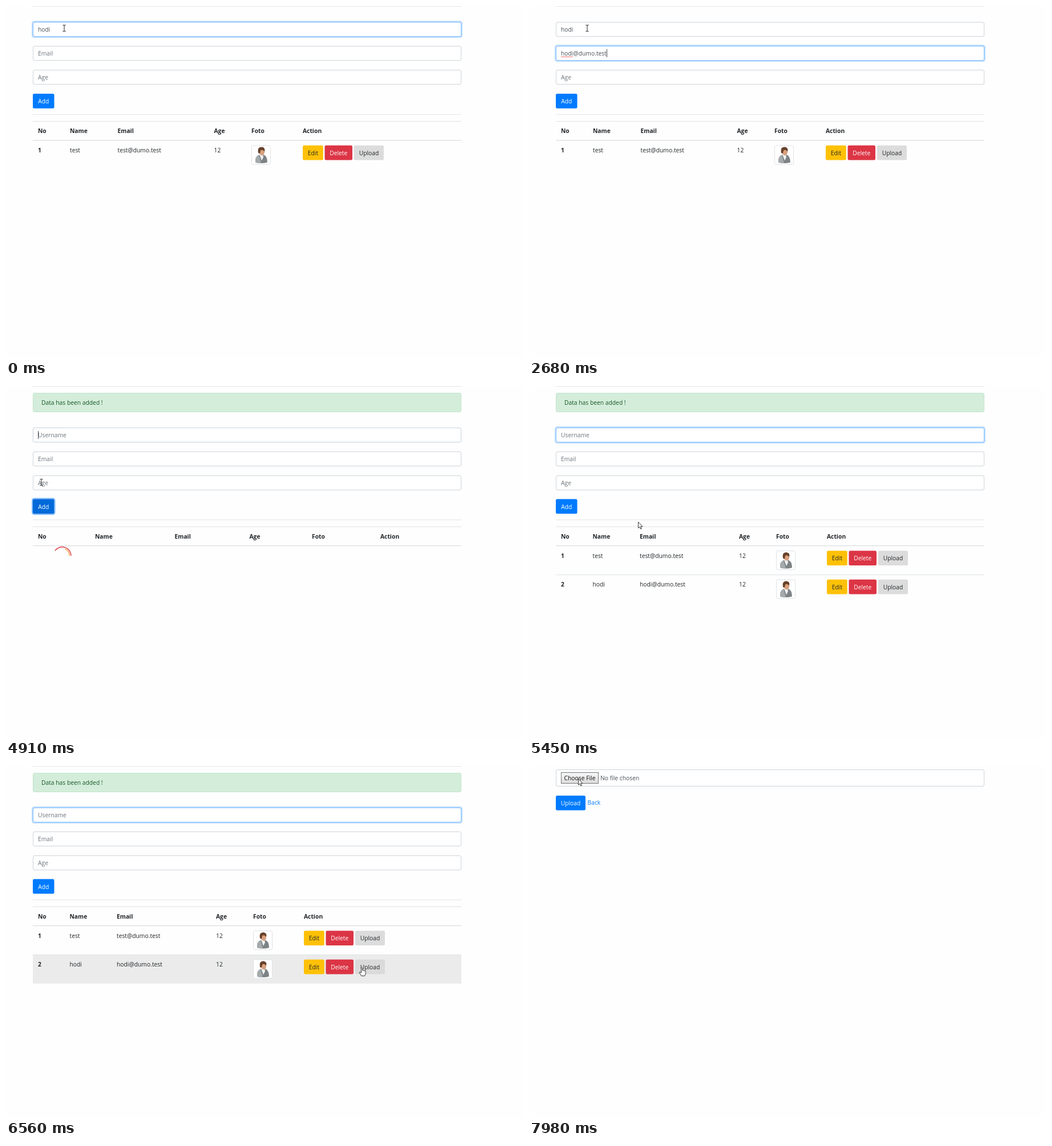
Recreate the animation shown at these times as an HTML page. Size 906 by 618 pixels, loop 8 s.

```html
<!DOCTYPE html>
<html lang="en">
<head>
<meta charset="utf-8">
<title>User table</title>
<style>
  html, body { margin: 0; width: 100%; height: 100%; overflow: hidden; background: #fefefe; }
  svg { display: block; width: 906px; height: 618px; font: 10.3px "Open Sans", "Noto Sans", sans-serif; }
  text { white-space: pre; }
</style>
</head>
<body>
<svg id="stage" viewBox="0 0 906 618"></svg>
<script>
const LOOP = 8000;
const LEFT = 47, WIDTH = 751;
const INK = '#212529', LINE = '#dee2e6', BLUE = '#007bff', DARK_BLUE = '#0069d9';
const USER = 'hodi', MAIL = 'hodi@dumo.test';

// Moments of the story, in ms
const EMAIL_FOCUS = 120, AGE_FOCUS = 2800, ADD_FOCUS = 3350;
const ADDED = 4890, LOADED = 5030, BLUR = 6700, UPLOAD_PAGE = 6850;

// Pointer path: time, x, y
const PATH = [
  [0, 102, 39], [4300, 102, 39], [4640, 62, 169], [5200, 62, 169],
  [5450, 190, 238], [5700, 430, 300], [5870, 526.5, 318], [6000, 545, 326],
  [6270, 592, 345], [6560, 623.5, 353], [6870, 623.5, 353], [7130, 400, 240],
  [7430, 137, 97], [7500, 137, 97], [7720, 95, 68], [7850, 88, 38], [7980, 86, 22], [LOOP, 86, 22]
];

const stage = document.getElementById('stage');
const pen = document.createElement('canvas').getContext('2d');
pen.font = '10.3px "Open Sans", "Noto Sans", sans-serif';

let pointer, cursor;

const clamp = v => Math.max(0, Math.min(1, v));
const ramp = (t, start) => { const k = clamp((t - start) / 150); return k * k * (3 - 2 * k); };
const inside = (x, y, w, h) =>
  pointer.x >= x && pointer.x <= x + w && pointer.y >= y && pointer.y <= y + h;

const rect = (x, y, w, h, fill, extra = '') =>
  `<rect x="${x}" y="${y}" width="${w}" height="${h}" fill="${fill}" ${extra}/>`;
const text = (x, y, label, fill = INK, extra = '') =>
  `<text x="${x}" y="${y}" fill="${fill}" ${extra}>${label}</text>`;
const path = (d, extra) => `<path d="${d}" ${extra}/>`;
const rule = (y, color = '#e5e5e5', h = 1) => rect(LEFT, y, WIDTH, h, color);
const box = (x, y, w, h, fill, border) =>
  rect(x + .5, y + .5, w - 1, h - 1, fill, `stroke="${border}" rx="2.5"`);
const ring = (x, y, w, h, alpha) =>
  rect(x - 1, y - 1, w + 2, h + 2, 'none', `stroke="${BLUE}" stroke-width="2" stroke-opacity="${alpha}" rx="3.5"`);

function pointerAt(t) {
  const i = Math.max(1, PATH.findIndex(p => p[0] > t));
  const [a, b] = [PATH[i - 1], PATH[i]];
  const k = (t - a[0]) / (b[0] - a[0]);
  return { x: a[1] + (b[1] - a[1]) * k, y: a[2] + (b[2] - a[2]) * k };
}

function button(x, y, w, label, fill, color, hoverFill, pressed) {
  const over = inside(x, y, w, 26);
  if (over) cursor = 'hand';
  return rect(x, y, w, 25.7, over || pressed ? hoverFill : fill, 'rx="2.5"') +
    text(x + w / 2, y + 17, label, color, 'text-anchor="middle"');
}

function field(y, value, placeholder, focus, caret) {
  if (inside(LEFT, y, WIDTH, 26)) cursor = 'beam';
  return (focus > 0 ? ring(LEFT, y, WIDTH, 26, .25 * focus) : '') +
    box(LEFT, y, WIDTH, 26, '#fff', '#ced4da') +
    (focus > 0 ? `<g opacity="${focus}">${box(LEFT, y, WIDTH, 26, 'none', '#80bdff')}</g>` : '') +
    text(56, y + 17, value || placeholder, value ? '#495057' : '#6c757d') +
    (caret ? rect(Math.round(56 + pen.measureText(value).width), y + 6, 1, 14, '#495057') : '');
}

function typedMail(t) {
  const count = t < 930 ? 0 : t < 1090 ? 2 : t < 1750 ? 5 : 6 + Math.floor((t - 1750) / 104);
  return MAIL.slice(0, count);
}

function squiggle(y) {
  let d = `M56 ${y}`;
  for (let x = 57.5, up = true; x < 78; x += 1.5, up = !up) d += `L${x} ${y - (up ? 1.5 : 0)}`;
  return path(d, 'fill="none" stroke="#e33" stroke-width=".8"');
}

function form(t, added) {
  const dy = added ? 45 : 0;
  const blink = since => (t - since) % 1060 < 530;
  const typingSince = t < 930 ? EMAIL_FOCUS : t < 1090 ? 930 : t < 1750 ? 1090 : t;
  const inEmail = t >= EMAIL_FOCUS && t < AGE_FOCUS;
  const inAge = t >= AGE_FOCUS && t < ADD_FOCUS;
  const nameFocus = added ? ramp(t, ADDED) - ramp(t, BLUR) : 1 - ramp(t, EMAIL_FOCUS);
  const addFocus = ramp(t, ADD_FOCUS) - ramp(t, ADDED + 20);
  const age = added || t < 3000 ? '' : t < 3130 ? '1' : '12';
  const addY = added ? 198.5 : 154;
  return field(28 + dy, added ? '' : USER, 'Username', nameFocus, added && t < BLUR && blink(ADDED)) +
    field(70 + dy, added ? '' : typedMail(t), 'Email',
      ramp(t, EMAIL_FOCUS) - ramp(t, AGE_FOCUS), inEmail && blink(typingSince)) +
    (inEmail && t >= 1750 ? squiggle(90) : '') +
    field(112 + dy, age, 'Age', ramp(t, AGE_FOCUS) - ramp(t, ADD_FOCUS), inAge) +
    (addFocus > 0 ? ring(LEFT, addY, 37.5, 25.7, .5 * addFocus) : '') +
    button(LEFT, addY, 37.5, 'Add', BLUE, '#fff', DARK_BLUE, added && t < LOADED - 60);
}

function portrait(x, y) {
  return box(x, y, 34, 34, '#fff', LINE) + `<g transform="translate(${x} ${y})">` +
    path('M7 30Q6 20 13 17L20 16Q28 18 28 30Q18 33 7 30Z', 'fill="#7d8285"') +
    path('M7 30Q6 20 13 17L17 31Q11 32 7 30Z', 'fill="#a5aaac"') +
    path('M14 16L20 15L21 21L18 27Z', 'fill="#eef1f3"') +
    '<ellipse cx="18.5" cy="11.5" rx="4.7" ry="6.3" fill="#d8a17e"/>' +
    path('M12 13Q10 3 18 3Q25 4 23 11Q20 7 16 9Q16 13 14 15Z', 'fill="#68412a"') + '</g>';
}

function row(index, y, columns, cells) {
  const over = inside(LEFT, y, WIDTH, 50);
  const [no, name, email, age, photo, action] = columns;
  return (over ? rect(LEFT, y, WIDTH, 50.5, '#ebebeb') : '') +
    (index > 1 ? rule(y - .5, LINE) : '') +
    text(no, y + 20.5, index, INK, 'font-weight="700"') +
    text(name, y + 20.5, cells[0]) + text(email, y + 20.5, cells[1]) + text(age, y + 20.5, '12') +
    portrait(photo, y + 8) +
    button(action, y + 8.3, 35.8, 'Edit', '#ffc107', INK, '#e0a800') +
    button(action + 38.5, y + 8.3, 48.5, 'Delete', '#dc3545', '#fff', '#c82333') +
    button(action + 90, y + 8.3, 52, 'Upload', '#dcdcdc', INK, '#dadada');
}

function loader(t) {
  const turn = (t - 4910) * .36;
  const arc = (r, from, color, angle) => {
    const a = from * Math.PI / 180;
    return path(`M${r * Math.cos(a)} ${r * Math.sin(a)}A${r} ${r} 0 0 1 ${r} 0`,
      `transform="translate(98.5 298) rotate(${angle})" fill="none" stroke="${color}" stroke-width="1.8"`);
  };
  return arc(15.5, -145, '#e15b64', turn) + arc(12.8, -68, '#f8b26a', turn * 1.5);
}

function table(t, added) {
  const loading = added && t < LOADED;
  const dy = added ? 44.5 : 0;
  const columns = loading ? [56, 156, 295.5, 426.5, 536, 656]
    : added ? [56, 111.5, 194, 368, 433, 522] : [56, 112, 195.5, 364.5, 430, 520];
  const titles = ['No', 'Name', 'Email', 'Age', 'Foto', 'Action'];
  const top = 236.5 + dy;
  return rule(190 + dy) + rule(202 + dy, LINE) +
    titles.map((s, i) => text(columns[i], 223 + dy, s, INK, 'font-weight="700"')).join('') +
    (loading ? loader(t) : row(1, top, columns, ['test', 'test@dumo.test'])) +
    (added && !loading ? row(2, top + 50.5, columns, [USER, MAIL]) : '') +
    rule(235.2 + dy, LINE, 1.4);
}

function listPage(t) {
  const added = t >= ADDED;
  return rule(0) +
    (added ? box(LEFT, 12, WIDTH, 34, '#d4edda', '#c3e6cb') + text(62, 33, 'Data has been added !', '#155724') : '') +
    form(t, added) + table(t, added);
}

function uploadPage() {
  const light = inside(56, 11, 66, 20) ? '#f8f8f8' : '#f2f2f2';
  return `<linearGradient id="grey" x2="0" y2="1"><stop stop-color="${light}"/><stop offset="1" stop-color="#dcdcdc"/></linearGradient>` +
    box(LEFT, 6, WIDTH, 30, '#fff', '#ced4da') +
    rect(56.5, 11.5, 65, 19, 'url(#grey)', 'stroke="#777"') +
    text(89, 25, 'Choose File', '#111', 'text-anchor="middle"') +
    text(125, 25, 'No file chosen', '#495057') +
    button(LEFT, 52, 52, 'Upload', BLUE, '#fff', DARK_BLUE) +
    text(102.5, 68, 'Back', BLUE);
}

const CURSORS = {
  beam: path('M-2.5 -5.5H-.8L0 -5L.8 -5.5H2.5M0 -5V5M-2.5 5.5H-.8L0 5L.8 5.5H2.5', 'fill="none" stroke="#222"'),
  arrow: path('M.5 .5V11.3L3 9L4.7 12.8L6.4 12L4.8 8.4H8Z', 'fill="#fff" stroke="#222" stroke-width=".9"'),
  hand: path('M-1 1Q0 -1 1.2 1V6Q2.5 5 3.4 6.5Q4.6 5.8 5.3 7.2Q6.7 7 6.7 8.5V11Q6 13 5.3 15.5H-.8Q-2 12.5-4.3 10Q-4.5 7.5-1 10Z',
    'fill="#fff" stroke="#222" stroke-width=".9" stroke-linejoin="round"')
};

function draw(now) {
  const t = now % LOOP;
  pointer = pointerAt(t);
  cursor = 'arrow';
  const page = t < UPLOAD_PAGE ? listPage(t) : uploadPage();
  stage.innerHTML = page + `<g transform="translate(${pointer.x} ${pointer.y})">${CURSORS[cursor]}</g>`;
}

const start = performance.now();
function tick() {
  draw(performance.now() - start);
  requestAnimationFrame(tick);
}
tick();
</script>
</body>
</html>
```
